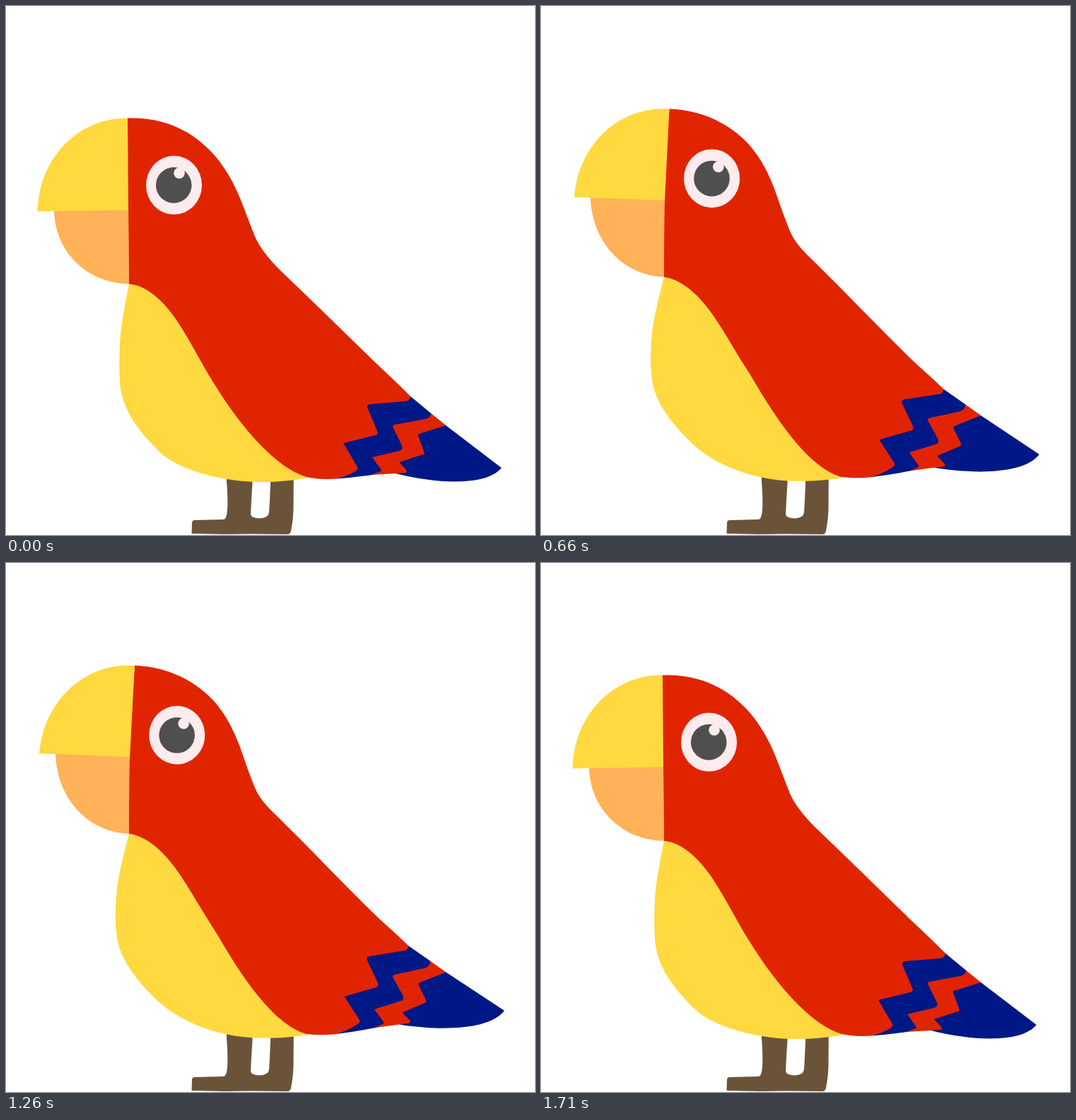
An HTML page for the animation above (1740 ms loop, 748 by 748 pixels).

```html
<!DOCTYPE html>
<html lang="en">
<head>
<meta charset="utf-8">
<title>Parrot</title>
<style>
  html, body { margin: 0; width: 100%; height: 100%; overflow: hidden; background: #fff; }
  svg { display: block; width: 100%; height: 100%; }
</style>
</head>
<body>
<svg id="stage" viewBox="0 0 748 748">
  <path fill="#6b5339" d="M311.5 640 L312 672 Q316 725 308 726 L267 727 Q263 727 263 731 L262.5 746 L310 747 L345 746.5 L398 747 Q402 747 403 742 Q407 722 406.500 700 L407 640 L374 640 L374 674 Q373 700 372 716 Q371 724 359 724.500 Q346 724 346 718 Q347 696 348.500 674 L348.500 640 Z"/>
</svg>
<script>
const LOOP = 1740, STEP = 30;
const RISE = 210, PEAK = 960, REST = 1750;
const stage = document.getElementById('stage');

// Each part: tag, fill, and its attributes in the low and the raised pose.
const parts = [
  ['path', '#ffd93f', {
    d: ['M174 393 C169 418 163 447 161 475 C160 495 160 515 161 530 C162 570 190 605 222 635 C251 658 310 673 360 673 C384 673 405 671 427 667 L300 480 L240 380 Z',
        'M174 378.5 C165 412 155 445 154 470 C152.5 485 152 506 154 519 C157 560 196 599 220 620 C254 650 308 671 360 671 C384 672 405 670 427 667 L300 480 L240 380 Z']
  }],
  ['path', '#e12400', {
    d: ['M172 158.5 C215 157 253 170 285 201 C305 220 320 245 331 272 C338 289 345 309 352 326 C359 342 372 358 388 374 C432 416 476 459 520 502 C537 518 555 535 572 552 L580 570 L601 576 L622 593 L610 620 L575 662 L551 661 L517 663 L500 655 L488 663 L468 668 C455 670 438 669 425 666 C382 653 334 598 296 537 C280 512 266 484 250 458 C230 424 202 395 174 393 L170 289 Z',
        'M186 139.5 C224 142 260 157 288 183 C308 202 322 229 332 259 C338 277 346 301 354 319 C361 334 375 346 390 360 C430 400 480 454 520 493 C535 508 552 521 568 537 L577 553 L599 557 L622 572.5 L612 600 L580 649 L558 649 L523 655 L504 647 L493 657 L468 665 C455 667 440 667 425 666 C372 651 326 567 296 514 C281 492 267 468 250 442 C230 412 205 384 174 378.5 L172 268 Z']
  }],
  ['path', '#001885', {
    d: ['M572 552 Q571 558 565 559 L515 563 Q510 564 511 568 L525 601 Q527 606 522 607 L477 618 L497 652 Q498 656 494 658 Q478 667 462 669 Q490 667 517 663 L527 659 Q533 658 530 655 L518 638 L556 629 Q562 627 560 622 L547 595 Q546 593 550 592 L593 584 Q601 582 601 576 Z',
        'M568 537 Q568 543 562 544 L514 553 Q508 554 510 558 L526 590 Q528 596 524 597 L479 611 L501 644 Q502 648 498 650 Q484 660 467 665 Q495 661 523 655 L533 650 Q537 649 535 646 L522 628 L560 615 Q564 614 562 608 L547 582 Q546 579 550 578 L592 568 Q600 566 599 557 Z']
  }],
  ['path', '#001885', {
    d: ['M622 593 L587 604 Q581 605 583 608 L591 630 Q593 633 590 634 L556 645 L566 656 Q568 660 565 660 L551 661 C610 676 680 679 700.5 653 Z',
        'M622 572.5 L586 588 Q582 590 584 593 L595 613 Q596 616 593 617 L562 632 L573 643 Q575 646 571 647 L558 649 C610 655 684 655 706.5 625 Z']
  }],
  ['path', '#ffb257', {
    d: ['M68 289 C69 347 114 392 174 393 C174 358 173.5 324 173 287 Z',
        'M71 260 C71 319 111 376 174 378.5 C174 340 174.5 300 176 266 Z']
  }],
  ['path', '#ffd93f', {
    d: ['M172 158.5 C101 158 46 216 44.5 290.5 L173 288.5 Z',
        'M186 139.5 C115 133 56 186.5 48 260.5 L176 268.3 Z']
  }],
  ['ellipse', '#fdeced', { cx: [237.5, 243.5], cy: [253.3, 239.3], rx: [39.5, 39.5], ry: [41.5, 41.3] }],
  ['circle', '#4f4f4f', { cx: [237.2, 243.5], cy: [253.4, 239.5], r: [25.3, 25.3] }],
  ['circle', '#fdeced', { cx: [245, 253.6], cy: [236.3, 223.3], r: [7.8, 7.8] }]
].map(([tag, fill, poses]) => {
  const el = document.createElementNS('http://www.w3.org/2000/svg', tag);
  el.setAttribute('fill', fill);
  stage.append(el);
  return { el, poses };
});

// Blend every number of text a towards the matching number of text b.
function blend(a, b, k) {
  const number = /-?\d+(\.\d+)?/g;
  const to = String(b).match(number);
  let i = 0;
  return String(a).replace(number, n => (+n + (to[i++] - n) * k).toFixed(2));
}

// Ease-in-out: cubic-bezier(.42, 0, .58, 1).
function ease(x) {
  let lo = 0, hi = 1;
  for (let i = 0; i < 24; i++) {
    const s = (lo + hi) / 2, q = 1 - s;
    if (1.26 * s * q * q + 1.74 * s * s * q + s * s * s < x) lo = s;
    else hi = s;
  }
  return lo * lo * (3 - 2 * lo);
}

function lift(t) {
  if (t < 270 || t >= 1710) return 0;
  const x = t < PEAK ? (t - RISE) / (PEAK - RISE) : (REST - t) / (REST - PEAK);
  return ease(x) * 1.015;
}

function draw(ms) {
  const k = lift(Math.floor(ms % LOOP / STEP) * STEP);
  for (const { el, poses } of parts)
    for (const name in poses) el.setAttribute(name, blend(...poses[name], k));
}

const start = performance.now();
function tick() {
  draw(performance.now() - start);
  requestAnimationFrame(tick);
}
tick();
</script>
</body>
</html>
```
